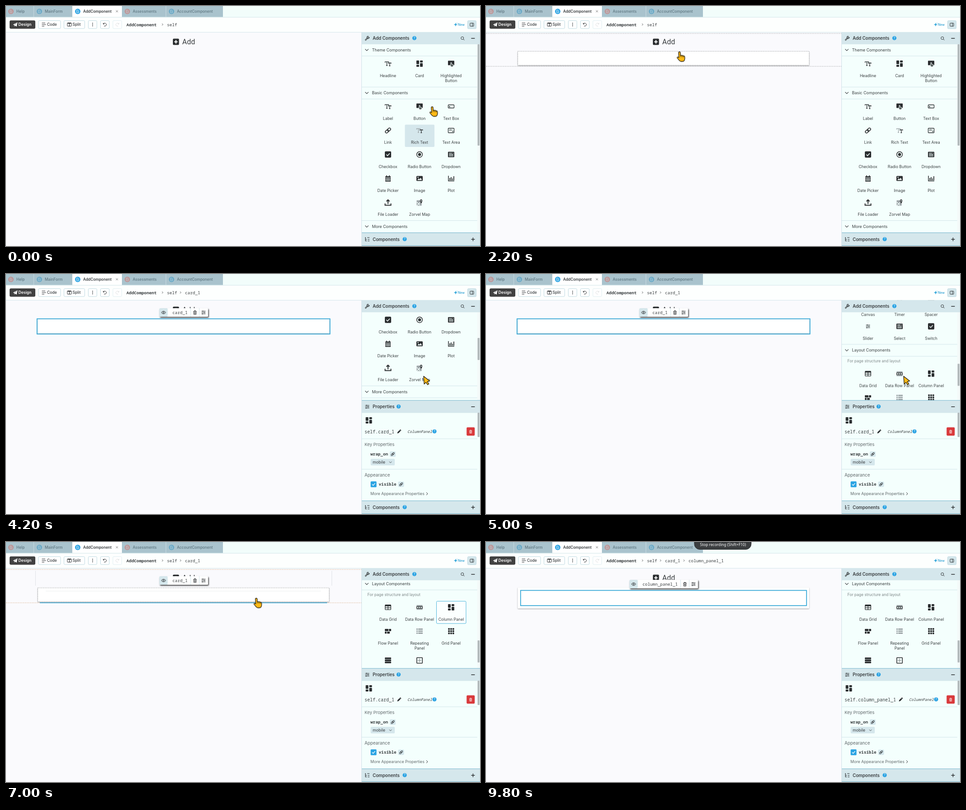
Write an HTML page that moves like this. It is 1051 px wide and 533 px high and loops after 10000 ms.

```html
<!DOCTYPE html>
<html lang="en">
<head>
<meta charset="utf-8">
<title>Form designer</title>
<style>
html,body{margin:0;width:100%;height:100%;overflow:hidden;background:#fafafd}
svg{display:block;width:100vw;height:100vh;font-family:Inter,"Open Sans",sans-serif}
text{fill:#3a3e40;stroke:none;white-space:pre}
.mono{font-family:"Noto Sans Mono","DejaVu Sans Mono",monospace}
.sans{font-family:"Noto Sans",sans-serif}
.rob{font-family:Roboto,sans-serif}
.soft{fill:#62696c}
.ic{fill:none;stroke:#2b2e30;stroke-width:1.3}
.ic .f{fill:#2b2e30;stroke:none}
.ic .w{stroke:#f4fffd}
.ic .g{fill:#9da5a8;stroke:none}
.ic .gs{stroke:#9da5a8}
.dash{fill:none;stroke:#a5a7aa;stroke-width:.9;stroke-dasharray:2.2 1.6}
.warm{stroke:#d9b08c}
.line{fill:none;stroke:#d3e5ea}
.blue{fill:none;stroke:#2ba3d4;stroke-width:1.7}
.step{animation:10s step-end -1ms infinite}
#scroll{animation:scroll 10s step-end -1ms infinite}
#thumb{animation:thumb 10s step-end -1ms infinite}
#cursor{animation:move 10s step-end -1ms infinite}
@keyframes scroll{
  0%,36%{transform:translateY(0);animation-timing-function:steps(3)}
  42%{transform:translateY(-228px)}
  44%{transform:translateY(-228px);animation-timing-function:steps(4)}
  52%,100%{transform:translateY(-533px)}
}
@keyframes thumb{
  0%,36%{transform:translateY(0);animation-timing-function:steps(3)}
  42%{transform:translateY(57px)}
  44%{transform:translateY(57px);animation-timing-function:steps(4)}
  52%,100%{transform:translateY(133.5px)}
}
@keyframes move{
  0%{transform:translate(946px,224px);animation-timing-function:steps(4)}
  8%{transform:translate(916px,138px)}
  12%{transform:translate(916px,138px);animation-timing-function:steps(5)}
  22%{transform:translate(430px,102px)}
  24%{transform:translate(430px,102px);animation-timing-function:steps(6)}
  36%{transform:translate(926px,227px)}
  52%{transform:translate(926px,227px);animation-timing-function:steps(3)}
  58%{transform:translate(1000px,160px)}
  60%{transform:translate(1000px,160px);animation-timing-function:steps(5)}
  70%{transform:translate(556px,125px)}
  74%{transform:translate(556px,125px);animation-timing-function:steps(6)}
  86%{transform:translate(795px,259px)}
  88%{transform:translate(855px,334px);animation-timing-function:steps(3)}
  94%,100%{transform:translate(600px,50px)}
}
</style>
</head>
<body>
<svg id="stage" viewBox="0 0 1051 533" preserveAspectRatio="none"></svg>
<script>
const R = (x, y, w, h, a = '') => `<rect x="${x}" y="${y}" width="${w}" height="${h}" ${a}/>`;
const P = (d, a = '') => `<path d="${d}" ${a}/>`;
const C = (x, y, r, a = '') => `<circle cx="${x}" cy="${y}" r="${r}" ${a}/>`;
const T = (x, y, s, size, a = '') => `<text x="${x}" y="${y + size * .36}" font-size="${size}" ${a}>${s}</text>`;
const M = (x, y, s, size, a = '') => T(x, y, s, size, 'class="mono" ' + a);
const mid = 'text-anchor="middle"', bold = 'font-weight="600"', med = 'font-weight="500"', pale = 'class="soft"';
const F = 'class="f"', W = 'class="w"', r1 = 'class="f" rx="1"';

// Shows a layer from a to b milliseconds of the loop
let css = '', layers = 0;
const on = (a, b, html) => {
  const k = 'on' + layers++;
  css += `@keyframes ${k}{0%{opacity:${a ? 0 : 1}}${a / 100}%{opacity:1}${b / 100}%{opacity:${b < 1e4 ? 0 : 1}}}`;
  return `<g class="step" style="animation-name:${k}">${html}</g>`;
};

const bigT = 'M-6.5-2.2V-4.2H1.5V-2.2M-2.5-4.2V4.3M-4.2 4.3H-.8';
const smallT = P('M.8 0V-1.5H6.8V0M3.8-1.5V5M2.4 5H5.2');
const icons = {
  text: P(bigT) + smallT,
  rich: P(bigT, 'class="gs"') + smallT,
  card: R(-7, -7, 6, 8, r1) + R(-7, 2.5, 6, 4.5, r1) + R(1, -7, 6, 4.5, r1) + R(1, -1, 6, 8, r1),
  button: R(-7, -6.5, 14, 10, r1) + P('M-1-2Q0-3.5 1-2V1L5 2.3V5L3.5 7H0L-2.6 3.4-1 3Z', 'fill="#59605f" class="w" stroke-width=".9"'),
  box: R(-6.5, -3.5, 13, 7, 'rx="1"') + P('M-4.2-1V1.3H-2M-3-1V1', 'stroke-width="1"'),
  link: '<g transform="rotate(-42)">' + R(-7, -2.7, 8, 5.4, 'rx="2.7" stroke-width="1.6"') + R(-1, -2.7, 8, 5.4, 'rx="2.7" stroke-width="1.6"') + '</g>',
  area: R(-6.5, -5, 13, 10, 'rx="1"') + T(-4.7, -1.4, 'abc', 4.5, bold) + P('M2.5 3.3L5 1'),
  check: R(-7, -7, 14, 14, 'class="f" rx="2"') + P('M-3.6 0L-1 2.7 3.8-2.5', 'class="w" stroke-width="1.6"'),
  radio: C(0, 0, 6.3, 'stroke-width="1.5"') + C(0, 0, 3.3, F),
  drop: R(-7, -6, 14, 12, r1) + P('M-5-3H2M-5 .2H5M-5 3H5', W) + P('M3-3.6H6L4.5-2Z', 'fill="#fff" stroke="none"'),
  date: R(-6, -5, 12, 12, r1) + P('M-3-7V-4M3-7V-4', 'stroke-width="1.6"') + P('M-6-2H6M-6 1.2H6M-6 4H6M-2-1V6M2-1V6', 'class="w" stroke-width=".9"'),
  image: R(-7, -5.5, 14, 11, 'class="f" rx="1.5"') + P('M-5 3.5L-2 0 0 1.8 2.5-1.5 5.3 3.5Z', 'fill="#f4fffd" stroke="none"') + C(-3.4, -2.5, 1.2, 'fill="#f4fffd" stroke="none"'),
  plot: P('M-6-6V5.5H7', 'stroke-width="1.5"') + P('M-3-1V4M0-3V4M3 0V4M6-5V4', 'stroke-width="1.7"'),
  load: P('M0 3V-5M-3.6-2.5L0-6 3.6-2.5', 'stroke-width="2"') + P('M-6.5 2V6H6.5V2', 'stroke-width="2"'),
  map: R(-6.5, -5, 11, 12, 'class="g" rx="1"') + P('M-6 7L4-3M-6-1L1 6', W) + P('M3.5 2C0-2 .3-7 3.5-7S7-2 3.5 2Z', F) + C(3.5, -3.7, 1.2, 'fill="#f4fffd" stroke="none"'),
  grid: R(-6.3, -5.3, 12.6, 10.6, 'rx="1"') + R(-6.3, -5.3, 12.6, 3, F) + P('M0-4V5M-6 1.2H6'),
  row: R(-6.5, -5, 13, 3.5, 'class="g"') + R(-6.3, -1.5, 12.6, 4) + P('M-2-1.5V2.5M2-1.5V2.5') + R(-6.5, 3, 13, 2.5, 'class="g"'),
  flow: R(-7, -5, 8, 5, r1) + R(2, -5, 5, 5, r1) + R(-7, 1, 4, 4.5, r1) + R(-2, 1, 6, 4.5, r1),
  repeat: [-6, -1.5, 3].map(y => R(-7, y, 3, 3, 'class="g"') + R(-3, y, 10, 3, 'class="g"')).join(''),
  nine: [-6.7, -1.9, 2.9].map(y => [-6.7, -1.9, 2.9].map(x => R(x, y, 3.8, 3.8, r1)).join('')).join(''),
  stack: [-6.5, -2, 2.5].map(y => R(-7, y, 14, 3.8, r1)).join(''),
  xy: R(-6.2, -6.2, 12.4, 12.4, 'rx="1" stroke-width="1.6"') + P('M-4 0H4M0-4V4', 'stroke-width="1" stroke-dasharray="1.5 1"'),
  wrench: P('M-4.5 4.5L1-1', 'stroke-width="2.6"') + P('M-4.5 4.5L1-1', 'class="w" stroke-width=".9"') + P('M4.6-2.2A2.7 2.7 0 1 1 2-4.8L1.8-2Z', 'stroke-width="1.1"'),
  slide: P('M-4.5-3H4.5M-4.5 0H4.5M-4.5 3H4.5M-1.5-4.3V-1.7M2-1.3V1.3M-2.5 1.7V4.3', 'stroke-width="1"'),
  tree: P('M-4-4V3.5H-1M-4 0H-1M-5-4H-3M0-4H5M1 0H5M1 3.5H5', 'stroke-width="1.1"'),
  search: C(-.7, -.7, 3, 'stroke-width="1"') + P('M1.5 1.5L4 4', 'stroke-width="1"'),
  minus: P('M-4 0H4', 'stroke-width="1.5"'),
  plus: P('M-4 0H4M0-4V4', 'stroke-width="1.4"'),
  down: P('M-3.6-1.8L0 1.8 3.6-1.8', 'stroke-width="1.1"'),
  right: P('M-1.5-3L1.5 0-1.5 3', 'stroke-width="1"'),
  eye: P('M-5 0Q0-6 5 0 0 6-5 0Z', 'stroke-width="1"') + C(0, 0, 1.5, 'stroke-width="1"'),
  bin: P('M-3.5-2.5H3.5M-1.3-2.5V-4H1.3V-2.5M-2.8-2.5L-2.4 4.5H2.4L2.8-2.5M-.9-.8V3M.9-.8V3', 'stroke-width="1"'),
  pen: P('M-4.5 4.5L-3.7 1.5 2.3-4.5 4.5-2.3-1.5 3.7Z', F) + P('M.6-3L3-.6', 'class="w" stroke-width=".7"'),
  send: P('M-5 0L5-5 3 4.5-.5 2.2-2 4.5-2.2 1.2Z', 'fill="#fff" stroke="none"') + P('M-2 1.2L3.5-3.5', 'stroke="#444" stroke-width=".7"'),
  lines: P('M-4.5-3.5H3M-4.5 0H4.5M-4.5 3.5H1', 'stroke-width="1.1"'),
  split: R(-4.5, -3.7, 9, 7.4, 'rx="1" stroke-width="1"') + P('M0-3.5V3.5M-4-2.7H4', 'stroke-width="1.2"'),
  dots: [-3, 0, 3].map(y => C(0, y, .9, F)).join(''),
  undo: P('M-3.6-3.6V-1H-1M-3.3-1.2A3.4 3.4 0 1 1-2 3', 'stroke-width="1"'),
  pane: R(-4, -3.5, 8, 7, 'rx="1" stroke-width="1"') + P('M1-3.5V3.5', 'stroke-width="1"')
};
const I = (name, x, y, a = '', k = 1) => `<g class="ic" transform="translate(${x} ${y})${k == 1 ? '' : ` scale(${k})`}" ${a}>${icons[name]}</g>`;
const help = (x, y) => C(x, y, 4.6, 'fill="#2ba3e3"') + T(x, y, '?', 7, `${mid} style="fill:#fff"`);

// Component palette
const cols = [847, 917, 987];
const cell = (x, y, a) => R(x - 32.5, y - 13.5, 65.5, 49.5, `rx="2" ${a}`);
const hover = 'fill="#d5e7ec"', held = 'fill="#fbffff" stroke="#4cb4da"';
const item = (x, y, [icon, ...words]) => I(icon, x, y) +
  words.map((s, i) => T(x, y + 26.7 + i * 11.4, s, 8.7, mid)).join('');
const section = (y, title) => I('down', 800, y) + T(811.5, y, title, 9) +
  P(`M789 ${y - 13}H1045M789 ${y + 13.5}H1045`, 'class="line"');
const row = (y, ...items) => items.map((it, i) => item(cols[i], y, it)).join('');

const palette = section(97.5, 'Theme Components') + section(193, 'Basic Components') +
  section(489.5, 'More Components') + section(626, 'Layout Components') +
  on(0, 200, cell(917, 277, hover)) + on(200, 600, cell(917, 223, hover)) +
  on(600, 1400, cell(917, 128, hover)) + on(1400, 2000, cell(917, 128, held)) +
  on(5800, 6200, cell(987, 678, hover)) + on(6200, 7600, cell(987, 678, held)) +
  row(128, ['text', 'Headline'], ['card', 'Card'], ['button', 'Highlighted', 'Button']) +
  row(223, ['text', 'Label'], ['button', 'Button'], ['box', 'Text Box']) +
  row(276.5, ['link', 'Link'], ['rich', 'Rich Text'], ['area', 'Text Area']) +
  row(329.8, ['check', 'Checkbox'], ['radio', 'Radio Button'], ['drop', 'Dropdown']) +
  row(383, ['date', 'Date Picker'], ['image', 'Image'], ['plot', 'Plot']) +
  row(436.5, ['load', 'File Loader'], ['map', 'Zorvel Map']) +
  row(520, ['xy', 'Canvas'], ['radio', 'Timer'], ['stack', 'Spacer']) +
  row(573, ['slide', 'Slider'], ['drop', 'Select'], ['check', 'Switch']) +
  T(801.5, 650, 'For page structure and layout', 8.45, 'style="fill:#7d8587"') +
  row(678, ['grid', 'Data Grid'], ['row', 'Data Row Panel'], ['card', 'Column Panel']) +
  row(731, ['flow', 'Flow Panel'], ['repeat', 'Repeating', 'Panel'], ['nine', 'Grid Panel']) +
  row(796, ['stack', 'Linear Panel'], ['xy', 'XY Panel']);

const bar = (y, h, icon, title, hx, sign) => R(789, y, 262, h, 'fill="#d5e7ec"') +
  I(icon, 801, y + h / 2) + T(813, y + h / 2, title, 9.7, bold) + help(hx, y + h / 2 - .5) + I(sign, 1035.5, y + h / 2);
const rule = y => P(`M789 ${y}H1051`, 'stroke="#8fc3d6" stroke-width="1.3"');

// Property editor
const owner = (name, dx) => M(795, 350, 'self.' + name, 10) + I('pen', 872 + dx, 349.5) +
  M(890 + dx, 350, 'ColumnPanel', 8.3, 'font-style="italic"') + help(950 + dx, 349.5);
const chip = (x, y) => R(x - 6.5, y - 6, 13, 12, 'rx="2" fill="#d5e7ec"') + I('link', x, y, 'stroke-width="1"', .6);
const props = R(789, 280, 262, 224, 'fill="#f4fffd"') + bar(281, 27.5, 'slide', 'Properties', 870.5, 'minus') + rule(280.6) +
  I('card', 804.5, 325) + on(2400, 7600, owner('card_1', 0)) + on(7600, 1e4, owner('column_panel_1', 48)) +
  R(1021.3, 340.4, 18, 18.6, 'rx="2" fill="#d93a3c"') + I('bin', 1030.3, 350, 'style="stroke:#fff"', .8) +
  P('M789 366H1045M789 433.5H1045', 'class="line"') +
  T(795, 378.5, 'Key Properties', 9.6, pale) + M(808, 400, 'wrap_on', 9.3, bold) + chip(857.5, 400) +
  R(808.5, 410.5, 53.5, 14.5, 'rx="2" fill="#d5e7ec"') + T(813, 418, 'mobile', 8.9) + I('down', 852.5, 418, '', .75) +
  T(795, 446, 'Appearance', 9.8, pale) + R(808.5, 460.5, 13, 13, 'rx="1.5" fill="#2ba3e3"') +
  P('M811.8 467L814.2 469.4 818.4 464.6', 'fill="none" stroke="#fff" stroke-width="1.4"') +
  M(826.5, 467, 'visible', 9.3, bold) + chip(876, 467) +
  T(808, 488.2, 'More Appearance Properties', 8.8, pale) + I('right', 933.5, 488) +
  R(1045.6, 308, 4.4, 54, 'rx="1" fill="#b2b9bb"');

const side = R(788, 58, 263, 475, 'fill="#f4fffd"') + P('M788.5 58V533', 'stroke="#cfe2e8"') +
  `<g id="scroll">${palette}</g>` + R(1045, 85, 6, 419, 'fill="#f4faf9"') +
  on(0, 2400, R(1045.6, 85, 4.4, 225, 'rx="1" fill="#b2b9bb"')) +
  on(2400, 1e4, `<g id="thumb">${R(1045.6, 85, 4.4, 49, 'rx="1" fill="#b2b9bb"')}</g>`) +
  bar(58.5, 26.5, 'wrench', 'Add Components', 905.5, 'minus') + I('search', 1012.5, 72) + on(2400, 1e4, props) +
  bar(504, 28.5, 'tree', 'Components', 884, 'plus') + rule(503.6) + rule(532.4);

// Tabs and toolbar
const tab = (x, w, name, dot, live) =>
  R(x, 0, w, 24.5, `fill="${live ? '#fff' : '#a9c3cd'}"`) + C(x + 12, 12, 6, `fill="${dot}"`) +
  P(`M${x + 9.7} 9H${x + 12.7}L${x + 14.3} 10.6V15H${x + 9.7}ZM${x + 11} 12H${x + 13}`, `fill="none" stroke="${live ? '#fff' : '#c5d8df'}" stroke-width=".8"`) +
  T(x + 24, 12, name, 8.3, live ? bold : med + ' style="fill:#5e7781"');
const key = (x, w, icon, label = '', dark) =>
  R(x + .5, 32.5, w - 1, 17.5, `rx="2" fill="${dark ? '#414141' : '#fff'}" stroke="${dark ? '#414141' : '#bfdae2'}"`) +
  I(icon, label ? x + 12.5 : x + w / 2, 41.2) + T(x + 19.5, 41.2, label, 8.6, dark ? bold + ' style="fill:#fff"' : med);
const crumb = (x, s) => I('right', x - 10, 41.2, '', .75) + M(x, 41.2, s, 9.3);

const head = R(0, 0, 1051, 25, 'fill="#f2fdfb"') + R(0, 25, 1051, 33, 'fill="#fdfffe"') +
  tab(-1, 62, 'Help', '#bd9496') + tab(62, 85, 'MainForm', '#6aa9c6') + tab(257, 97.5, 'Assessments', '#bd9496') +
  tab(355, 126, 'AccountComponent', '#6aa9c6') + tab(147, 110, 'AddComponent', '#2ba3e3', true) +
  P('M61.5 0V24.5M354.7 0V24.5', 'stroke="#c6d9e0"') + P('M243.7 9.5L248.3 14M248.3 9.5L243.7 14', 'stroke="#777" stroke-width=".9"') +
  P('M0 25H1051M0 58.3H1051', 'class="line"') +
  key(8, 57, 'send', 'Design', true) + key(71.5, 50, 'lines', 'Code') + key(128, 47, 'split', 'Split') +
  key(182, 20, 'dots') + key(209, 20.5, 'undo') +
  R(237, 32.5, 19.5, 17.5, 'rx="2" fill="#fff" stroke="#e0eef2"') +
  `<g opacity=".15" transform="matrix(-1 0 0 1 493.5 0)">${I('undo', 246.7, 41.2)}</g>` +
  M(267, 41.2, 'AddComponent', 9.3, 'font-weight="700"') + crumb(357, 'self') +
  on(2400, 1e4, crumb(397, 'card_1')) + on(7600, 1e4, crumb(449, 'column_panel_1')) +
  P('M997 37.5L998 40.2 1000.8 41.2 998 42.2 997 45 996 42.2 993.2 41.2 996 40.2ZM1000 37v2.4M998.8 38.2h2.4', 'fill="#2ba3d8" stroke="#2ba3d8" stroke-width=".3"') +
  T(1002, 41.5, 'New', 7, med + ' style="fill:#2b9fd2"') +
  R(1023.5, 32.5, 19, 18, 'rx="2" fill="#d5e7ec" stroke="#bfdae2"') + I('pane', 1033, 41.5);

// Form canvas
const dashes = (y, warm = '') => P(`M0 61H788M0 ${y}H788`, `class="dash ${warm}"`);
const frame = (x, y, w, h) => R(x, y, w, h, 'class="dash"');
const sheet = h => R(70.5, 101, 646, h, 'rx="1" fill="#fff" filter="url(#soft)"');
const popup = (x, y, w, name) => R(x, y, w, 19, 'rx="2" fill="#fff" filter="url(#deep)"') +
  R(x, y, 18.5, 19, 'rx="2" fill="#d5e7ec"') + I('eye', x + 9.3, y + 9.5) + M(x + 29, y + 9.5, name, 9.3) +
  P(`M${x + w - 38.5} ${y}v19M${x + w - 19.5} ${y}v19`, 'class="line"') +
  I('bin', x + w - 29, y + 9.5) + I('slide', x + w - 10, y + 9.5);

const form = R(0, 58.5, 788, 475, 'fill="#fafafd"') +
  R(370, 72.5, 13.6, 14, 'rx="2" fill="#2b2e30"') + P('M373 79.5H380.6M376.8 75.7V83.3', 'stroke="#fff" stroke-width="2.2"') +
  T(390.8, 79.7, 'Add', 16, 'class="rob"') +
  on(1600, 2000, dashes(100)) + on(2000, 3400, dashes(134)) +
  on(2000, 6600, sheet(30.5)) + on(6600, 7600, sheet(31.5)) + on(2000, 2400, frame(70.5, 100.5, 646, 31)) +
  on(2400, 6600, R(68.8, 99.5, 649.6, 33.8, 'class="blue"')) +
  on(6600, 7600, dashes(135, 'warm') + P('M65.5 64V97M722.5 64V97', 'stroke="#dfe2e6"') +
    frame(70.5, 102, 646, 31) + P('M88 109H698', 'stroke="#eceff0"') + P('M75 135H712', 'class="blue"')) +
  on(2400, 7600, popup(340, 76, 108, 'card_1')) +
  on(7600, 1e4, sheet(46.5)) + on(7600, 8800, dashes(150.3) + frame(70.5, 100.5, 646, 47)) +
  on(7600, 1e4, R(76.7, 107.5, 634, 33.8, 'class="blue"')) + on(7600, 8800, frame(78.3, 109, 631, 31)) +
  on(7600, 1e4, popup(318, 84, 152, 'column_panel_1'));

const ink = 'fill="#fcb916" stroke="#1d1a12" stroke-width="1.3" stroke-linejoin="round"';
const hand = '<g transform="translate(-1.2 0) rotate(-4)">' +
  P('M-2 2Q-2-.3 0-.3T2 2V8Q4 7 5.4 8.4 7.5 7.6 8.4 9.3 11 9.2 11 12V15Q10.6 20 7.5 21.5H2Q-1 20.5-3 17L-5.8 13Q-6.2 10.3-3.8 11L-2 12.6Z', ink) +
  P('M2 8V11.5M5.4 8.8V12M8.4 9.8V12.5', 'fill="none" stroke="#1d1a12"') + '</g>';
const arrow = P('M0 0L1.2 17.5 5.2 13.6 8.8 19 11.6 17.2 8.2 12 13.4 10.6Z', ink);
const pointer = `<g id="cursor">${on(0, 2800, hand) + on(2800, 5400, arrow) + on(5400, 8000, hand) + on(8000, 9600, arrow)}</g>`;
const tip = on(9600, 1e4, R(462, -12, 126, 28.5, 'rx="12" fill="#3b3e40" stroke="#2c2f31"') +
  T(525.5, 6, 'Stop recording (Shift+F10)', 8.4, `class="sans" ${mid} ${med} style="fill:#fff"`));

const shade = (id, dx, dy, blur, alpha) => `<filter id="${id}" x="-10%" y="-50%" width="120%" height="220%"><feDropShadow dx="${dx}" dy="${dy}" stdDeviation="${blur}" flood-color="#000" flood-opacity="${alpha}"/></filter>`;
document.getElementById('stage').innerHTML =
  `<defs>${shade('soft', 0, 1, .9, .45)}${shade('deep', 1.5, 2, 1.7, .75)}</defs>` + form + side + head + pointer + tip +
  `<style>${css}</style>`;
</script>
</body>
</html>
```
